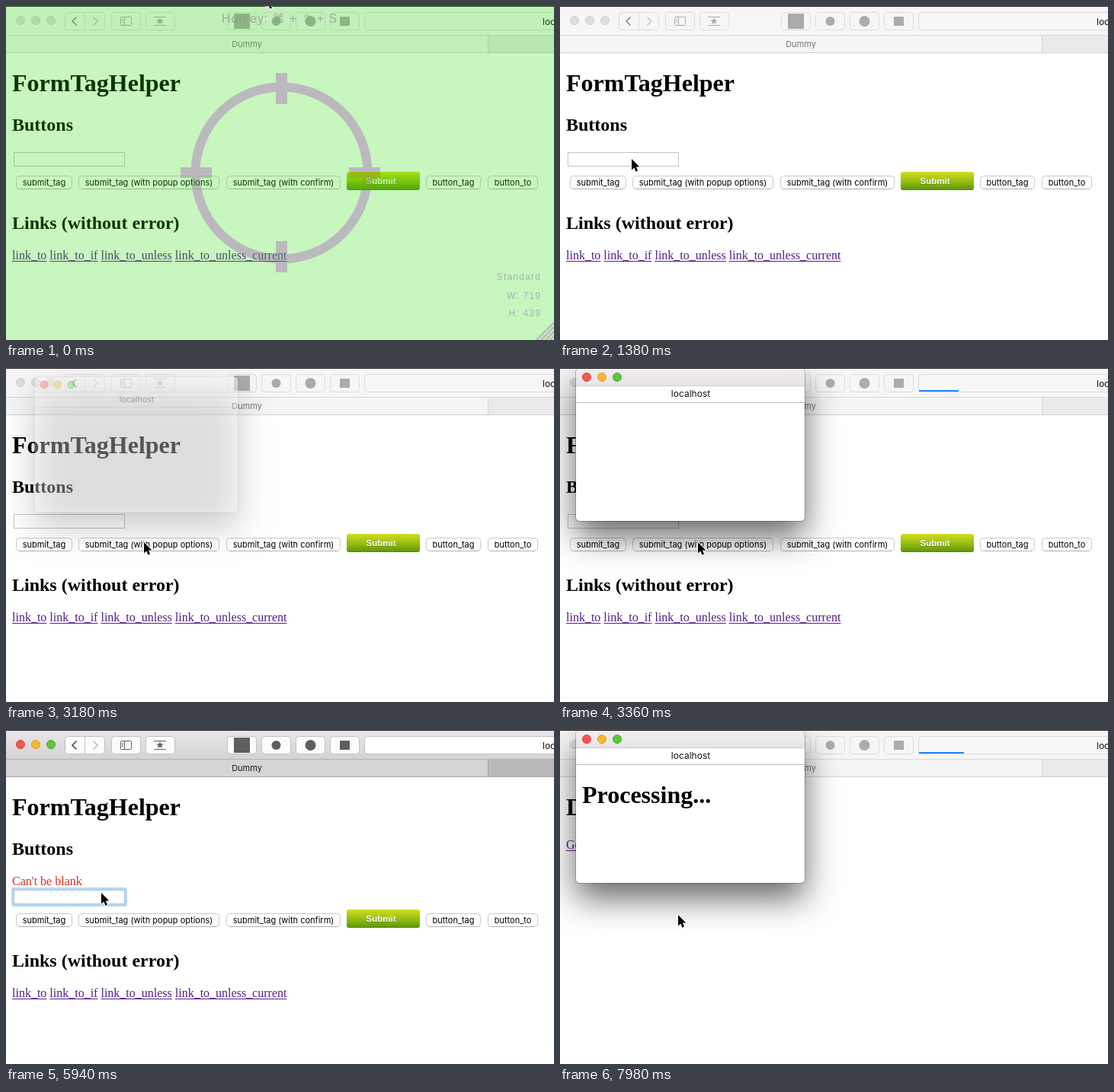
Recreate the animation shown at these times as an HTML page with a canvas. Size 719 px wide and 439 px high, loop 8 s.

```html
<!DOCTYPE html>
<html lang="en">
<head>
<meta charset="utf-8">
<title>FormTagHelper demo</title>
<style>
html, body { margin: 0; width: 719px; height: 439px; overflow: hidden; background: #fff; }
canvas { display: block; }
</style>
</head>
<body>
<canvas id="stage" width="719" height="439"></canvas>
<script>
const c = document.getElementById('stage').getContext('2d');
const W = 719, H = 439, LOOP = 8000, STEP = 60;
const UI = 'Inter, sans-serif';
const SERIF = '"Liberation Serif", serif';
const SANS = '"Liberation Sans", "DejaVu Sans", sans-serif';

// Pointer stops: time, x, y
const STOPS = [
  [0, 341, -13], [240, 341, -13], [840, 88, 208], [1200, 88, 208],
  [1380, 94, 201], [1620, 94, 201], [1860, 112, 191], [2220, 204, 220],
  [2460, 180, 228], [2520, 181, 229], [4560, 181, 229], [5040, 125, 214],
  [6720, 125, 214], [7080, 155, 243]
];
const KEYS = [6060, 6180, 6240, 6360];
const FIRST = 3180, SECOND = 7620;

const clamp = v => Math.max(0, Math.min(1, v));
const ramp = (t, a, b) => clamp((t - a) / (b - a));
const ease = p => p * p * (3 - 2 * p);
const within = (t, a, b) => t >= a && t < b;

function rect(x, y, w, h, fill) {
  c.fillStyle = fill;
  c.fillRect(x, y, w, h);
}

function round(x, y, w, h, r, fill, line) {
  c.beginPath();
  c.roundRect(x, y, w, h, r);
  if (fill) { c.fillStyle = fill; c.fill(); }
  if (line) { c.strokeStyle = line; c.lineWidth = 1; c.stroke(); }
}

function disc(x, y, r, fill, line) {
  c.beginPath();
  c.arc(x, y, r, 0, Math.PI * 2);
  c.fillStyle = fill;
  c.fill();
  if (line) { c.strokeStyle = line; c.lineWidth = 1; c.stroke(); }
}

function text(s, x, y, font, color, align = 'left') {
  c.font = font;
  c.fillStyle = color;
  c.textAlign = align;
  c.fillText(s, x, y);
}

function lines(points, color, width) {
  c.beginPath();
  points.forEach(([x, y], i) => i ? c.lineTo(x, y) : c.moveTo(x, y));
  c.strokeStyle = color;
  c.lineWidth = width;
  c.stroke();
}

function vertical(y0, y1, ...colors) {
  const g = c.createLinearGradient(0, y0, 0, y1);
  colors.forEach((k, i) => g.addColorStop(i / (colors.length - 1), k));
  return g;
}

function lights(x, y, on) {
  const fills = on ? ['#f4574e', '#f7b731', '#62c53a'] : ['#dddddd', '#dddddd', '#dddddd'];
  const edges = on ? ['#dd4139', '#dda022', '#4aa928'] : ['#cfcfcf', '#cfcfcf', '#cfcfcf'];
  fills.forEach((f, i) => disc(x + 20 * i, y, 5.5, f, edges[i]));
}

function star(x, y, r) {
  c.beginPath();
  for (let i = 0; i < 10; i++) {
    const a = i * Math.PI / 5 - Math.PI / 2, d = i % 2 ? r * 0.42 : r;
    c.lineTo(x + d * Math.cos(a), y + d * Math.sin(a));
  }
  c.fill();
}

function progress(t) {
  if (t >= SECOND) return [60 * (1 - Math.exp((SECOND - t) / 90)), 1];
  if (!within(t, FIRST, FIRST + 780)) return [0, 0];
  const s = t - FIRST;
  const w = 60 * (1 - Math.exp(-s / 90)) + 190 * ramp(s, 420, 600);
  return [w, 1 - ramp(s, 600, 780)];
}

function browser(t, on) {
  rect(0, 0, W, 39, on ? vertical(1, 38, '#e9e7e9', '#d4d2d4') : '#f6f6f6');
  rect(0, 0, W, 1, '#2b2428');
  rect(0, 38, W, 1, on ? '#b4b2b4' : '#d9d9d9');
  rect(0, 39, 632, 22, on ? '#d6d4d6' : '#f5f5f5');
  rect(632, 39, W - 632, 22, on ? '#bab8ba' : '#ebe9eb');
  rect(632, 39, 1, 22, on ? '#a5a3a5' : '#d2d2d2');
  rect(0, 61, W, 1, on ? '#a9a7a9' : '#d2d2d2');
  lights(19, 19, on);

  const face = on ? '#fbfbfb' : '#f6f6f6', edge = on ? '#c3c1c3' : '#dcdcdc';
  const icon = on ? '#5f5f5f' : '#ababab';
  for (const [x, w] of [[77, 52], [138, 38], [183, 38], [290, 38], [335, 38], [380, 38], [425, 38]])
    round(x + 0.5, 8.5, w, 23, 4, face, edge);
  rect(103, 9, 1, 22, edge);
  lines([[92.5, 14.5], [87, 20], [92.5, 25.5]], on ? '#4d4d4d' : '#8a8a8a', 1.6);
  lines([[114.5, 14.5], [120, 20], [114.5, 25.5]], on ? '#bcbcbc' : '#c6c6c6', 1.6);

  round(150.5, 14.5, 14, 11, 1, null, icon);
  rect(155, 15, 1, 10, icon);
  for (let y = 17; y < 23; y += 2) rect(152, y, 2, 1, icon);
  c.fillStyle = icon;
  star(202, 20, 5);
  rect(194, 14, 16, 1, icon);
  rect(194, 25, 16, 1, icon);

  // Plain stand-ins for the extension marks
  rect(299, 10, 21, 20, icon);
  disc(354.5, 20, 6, icon);
  disc(399.5, 20, 7, icon);
  rect(438, 14, 13, 12, icon);

  round(470.5, 8.5, 300, 23, 4, on ? '#ffffff' : '#f7f7f7', edge);
  const [w, a] = progress(t);
  if (a > 0) {
    c.globalAlpha = a;
    rect(471, 29, w, 2, '#1a82fb');
    c.globalAlpha = 1;
  }
  text('localhost', 704, 25, '12px ' + UI, '#111');
  text('Dummy', 316, 54, '11px ' + UI, on ? '#1c1c1c' : '#777', 'center');
}

function button(label, x, w, y, down) {
  const fill = down ? vertical(y, y + 17, '#6cb3fa', '#156cf0') : '#ffffff';
  round(x + 0.5, y + 0.5, w - 1, 17, 4, fill, down ? '#3b86ea' : '#c9c9c9');
  if (!down) rect(x + 4, y + 17, w - 8, 1, '#b0b0b0');
  text(label, x + w / 2, y + 13, '11px ' + UI, down ? '#fff' : '#000', 'center');
}

function link(label, x, y) {
  text(label, x, y, '16px ' + SERIF, '#551a8b');
  const w = c.measureText(label).width;
  rect(x, y + 2, w, 1, '#551a8b');
  return x + w + 4;
}

function form(t) {
  const failed = t >= FIRST + 300;
  const d = failed ? 18 : 0;
  text('FormTagHelper', 8, 112, 'bold 32px ' + SERIF, '#000');
  text('Buttons', 8, 164, 'bold 24px ' + SERIF, '#000');
  if (failed) text("Can't be blank", 8, 204, '16px ' + SERIF, '#e8291c');

  const focused = within(t, 5400, 7380);
  if (focused) round(7, 189 + d, 152, 25, 3, '#b9d7f3');
  rect(10, 192 + d, 146, 19, focused ? '#a5c3e0' : '#c3c3c3');
  rect(11, 193 + d, 144, 17, '#fff');
  const typed = 'test'.slice(0, KEYS.filter(k => t >= k).length);
  text(typed, 13, 205 + d, '11px ' + UI, '#000');
  if (within(t, 5400, 5940) || within(t, KEYS[0], 6780))
    rect(Math.round(13 + c.measureText(typed).width), 195 + d, 1, 13, '#000');

  const down = within(t, 2940, FIRST) || within(t, 7380, SECOND);
  const y = 223 + d;
  button('submit_tag', 13, 74, y);
  button('submit_tag (with popup options)', 95, 185, y, down);
  button('submit_tag (with confirm)', 289, 150, y);
  button('button_tag', 551, 72, y);
  button('button_to', 632, 66, y);

  round(447, y - 5, 96, 24, 3, vertical(y - 5, y + 19, '#d0de21', '#9abf12', '#5c940a'));
  rect(449, y + 18, 92, 1, '#568a0a');
  const bold = 'bold 11.5px ' + SANS;
  text('Submit', 492, y + 12, bold, 'rgba(60,90,0,.5)', 'center');
  text('Submit', 492, y + 11, bold, '#fff', 'center');

  text('Links (without error)', 8, 293 + d, 'bold 24px ' + SERIF, '#000');
  let x = 8;
  for (const s of ['link_to', 'link_to_if', 'link_to_unless', 'link_to_unless_current'])
    x = link(s, x, 333 + d);
}

function donePage() {
  text('Done', 8, 112, 'bold 32px ' + SERIF, '#000');
  link('Go back', 8, 156);
}

function popup(s, closing) {
  const shown = closing ? 1 - ramp(s, 540, 720) : ramp(s, -60, 120);
  if (shown <= 0) return;
  const k = closing ? 1 : 0.85 + 0.15 * ease(shown);
  c.save();
  c.globalAlpha = shown;
  c.translate(171, 101);
  c.scale(k, k);
  c.translate(-171, -101);
  c.save();
  c.shadowColor = 'rgba(0,0,0,.6)';
  c.shadowBlur = 44;
  c.shadowOffsetY = 20;
  round(21, 1, 300, 200, 5, '#fff');
  c.restore();
  round(20.5, 0.5, 301, 201, 5, null, 'rgba(0,0,0,.22)');
  round(21, 1, 300, 22, [5, 5, 0, 0], vertical(1, 23, '#f0eef0', '#e6e4e6'));
  rect(21, 23, 300, 1, '#cfcdcf');
  rect(21, 45, 300, 1, '#bdbbbd');
  lights(35, 12, true);
  text('localhost', 171.5, 38, '12px ' + UI, '#111', 'center');
  if (s >= 240) text('Processing...', 29, 96, 'bold 32px ' + SERIF, '#000');
  c.restore();
}

// Capture-area picker seen at the very start
function picker() {
  rect(0, 0, W, H, 'rgba(32,220,0,.25)');
  c.save();
  c.globalCompositeOperation = 'darken';
  const gray = '#bbb9bd';
  c.beginPath();
  c.arc(361.5, 219.5, 113, 0, Math.PI * 2);
  c.strokeStyle = gray;
  c.lineWidth = 12;
  c.stroke();
  for (const y of [88, 309]) rect(354, y, 15, 41, gray);
  for (const x of [229, 450]) rect(x, 212, 41, 14, gray);
  c.letterSpacing = '1px';
  text('Hotkey: ⌘ + ⇧ + S', 359, 22, '16px ' + SANS, '#a3a5a3', 'center');
  c.letterSpacing = '1.2px';
  ['Standard', 'W: 719', 'H: 439'].forEach((s, i) =>
    text(s, 702, [360, 385, 408][i], '12px ' + SANS, '#b0adb3', 'right'));
  c.letterSpacing = '0px';
  for (let n = 6; n <= 24; n += 6) lines([[W - n, H + 1], [W + 1, H - n]], gray, 2.6);
  c.restore();
}

function pointer(t) {
  let i = 0;
  while (i < STOPS.length - 2 && t >= STOPS[i + 1][0]) i++;
  const [t0, x0, y0] = STOPS[i], [t1, x1, y1] = STOPS[i + 1];
  const p = ease(ramp(t, t0, t1));
  c.save();
  c.translate(x0 + (x1 - x0) * p, y0 + (y1 - y0) * p);
  c.beginPath();
  for (const [x, y] of [[0, 0], [0, 14.5], [3.3, 11.5], [5.5, 16.7], [8, 15.6], [5.9, 10.6], [10.3, 10.6]])
    c.lineTo(x, y);
  c.closePath();
  c.lineJoin = 'round';
  c.lineWidth = 2;
  c.strokeStyle = '#fff';
  c.stroke();
  c.fillStyle = '#000';
  c.fill();
  c.restore();
}

function draw(t) {
  const on = within(t, 1500, FIRST) || within(t, FIRST + 540, SECOND);
  rect(0, 0, W, H, '#fff');
  browser(t, on);
  if (t >= SECOND + 300) donePage();
  else form(t);
  if (t >= SECOND) popup(t - SECOND, false);
  else if (t >= FIRST) popup(t - FIRST, t >= FIRST + 540);
  if (t < STEP) picker();
  pointer(t);
}

const start = performance.now();
function tick(now) {
  const t = Math.max(0, now - start) % LOOP;
  draw(Math.floor(t / STEP) * STEP);
  requestAnimationFrame(tick);
}
draw(0);
requestAnimationFrame(tick);
</script>
</body>
</html>
```
